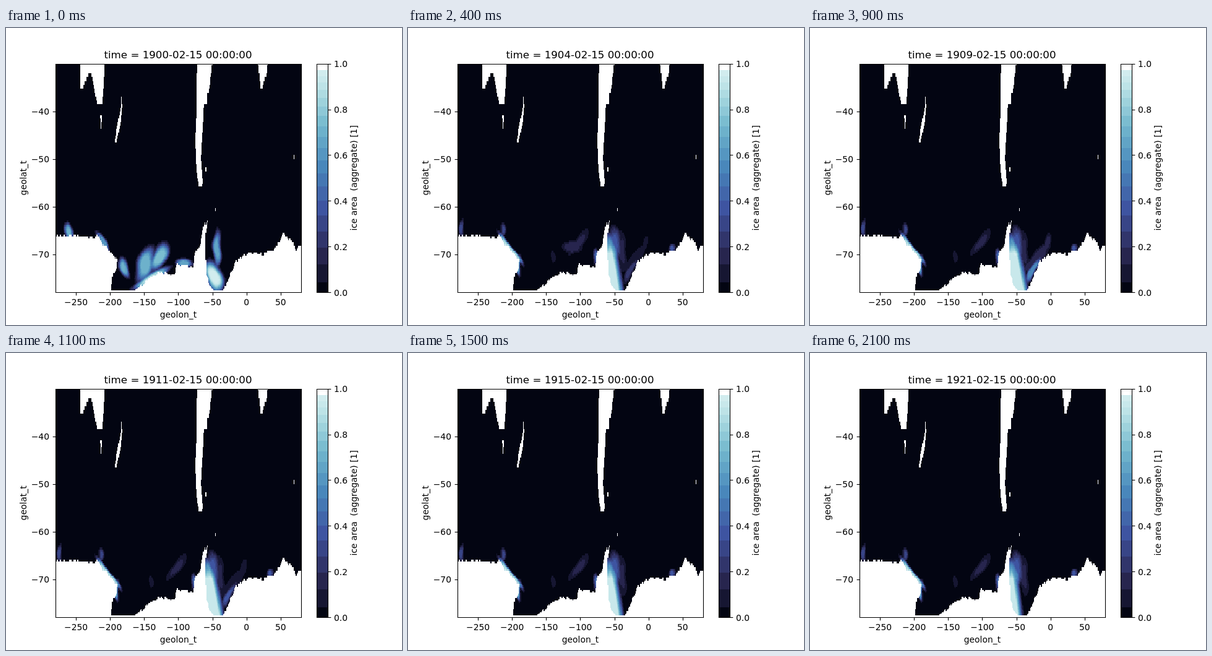
An HTML page with a canvas for the animation above (2.2 s loop, 640 by 480 pixels).

```html
<!DOCTYPE html>
<html lang="en">
<head>
<meta charset="utf-8">
<title>Ice area</title>
<style>
  html, body { margin: 0; width: 100%; height: 100%; overflow: hidden; background: #fff; }
  canvas, svg { position: absolute; left: 0; top: 0; width: 640px; height: 480px; }
  text { font: 13.89px "DejaVu Sans", Verdana, sans-serif; white-space: pre; fill: #000; }
  #title { font-size: 16.67px; }
  .line { fill: none; stroke: #000; stroke-width: 1.1; }
</style>
</head>
<body>
<canvas id="map" width="640" height="480"></canvas>
<svg id="axes" viewBox="0 0 640 480"></svg>
<script>
const LEFT = 80, RIGHT = 476.8, TOP = 57.6, BOTTOM = 427.2;
const PER_LON = (RIGHT - LEFT) / 360, PER_LAT = 7.7;
const FIRST_YEAR = 1900, YEARS = 22, STEP = 100;

const clamp = (v, lo = 0, hi = 1) => Math.min(hi, Math.max(lo, v));
const mix = (a, b, t) => a + (b - a) * t;
const smooth = v => { const t = clamp(v); return t * t * (3 - 2 * t); };
const lonX = lon => LEFT + (lon + 280) * PER_LON;
const latY = lat => TOP + (-30 - lat) * PER_LAT;
const random = n => { const s = Math.sin(n * 12.9898) * 43758.5453; return s - Math.floor(s); };

// Colour scale: flat bands that get narrower towards the top
const BANDS = 20;
const ramp = ['030512', '2c2a57', '3e53a0', '4886bb', '72b8cd', 'c0e5e8', 'ffffff']
  .map(hex => [0, 2, 4].map(i => parseInt(hex.slice(i, i + 2), 16)));
const bandEdge = i => i === 0 ? 0 : i === BANDS - 1 ? .973 : i === BANDS ? 1
  : .045 + .077 * (i - 1) - .0015 * (i - 1) * (i - 2);
function rampColour(v) {
  const p = v * 5.5, i = Math.floor(p);
  return `rgb(${ramp[i].map((c, k) => Math.round(mix(c, ramp[i + 1][k], p - i)))})`;
}
const bands = Array.from({ length: BANDS }, (_, i) =>
  i === 0 ? rampColour(0) : i === BANDS - 1 ? '#fff' : rampColour((bandEdge(i) + bandEdge(i + 1)) / 2));
const bandOf = v => {
  let i = 0;
  while (i < BANDS - 1 && v >= bandEdge(i + 1)) i++;
  return i;
};

// Land: key points of each coast
const shape = points => new Path2D(`M${points}Z`);
const polar = shape('70,335 150,338 156,349 170,364 180,375 179,391 173,396 170,424 208,424 222,413 ' +
  '230,404 248,394 273,398 275,383 303,385 305,360 313,355 318,324 326,311 323,330 322,345 324,398 ' +
  '330,417 336,424 351,424 362,400 372,376 390,364 418,365 434,358 448,332 464,347 468,359 480,347 ' +
  '480,440 70,440');
const lands = [
  '119,50 120,95 125,95 131,80 134,73 138,73 142,97 148,125 155,126 158,95 160,50',
  '152,141 153,163 154,163 155,141',
  '183,96 186,110 185,133 179,163 176,185 179,185 184,160 188,126 186,108',
  '309,50 308,140 306,180 308,230 312,257 316,257 318,250 315,212 320,126 325,122 325,105 329,100 334,50',
  '407,50 409,75 411,95 415,95 421,74 423,50'
].map(shape);
const islets = [[322, 225, 2, 7], [338, 291, 1, 5], [465, 205, 1, 7]];

// How patches come and go over the years
const settle = year => smooth(year / 3.5);
const thaw = year => 1 - settle(year);
const pulse = (peak, spread) => year => Math.exp(-(((year - peak) / spread) ** 2));
const early = pulse(4, 1.8), middle = pulse(8, 4);

// Sheared soft ellipse; lean is the sideways drift per pixel down
const patch = (life, strength, x, y, rx, ry, lean = 0) => ({ life, strength, x, y, rx, ry, lean });
const patches = [
  patch(thaw, .68, 101, 329, 9, 19),
  patch(thaw, .6, 157, 347, 8, 24, .55),
  patch(thaw, .68, 191, 387, 10, 22, .3),
  patch(thaw, .72, 225, 382, 18, 38, -.25),
  patch(thaw, .76, 248, 370, 17, 30, -.35),
  patch(thaw, .88, 235, 404, 18, 24, -1.5),
  patch(thaw, .65, 288, 380, 18, 10),
  patch(thaw, .64, 341, 357, 9, 40),
  patch(thaw, .95, 336, 402, 19, 34, .25),

  patch(settle, .28, 87, 324, 5, 20),
  patch(settle, .28, 153, 326, 6, 15),
  patch(settle, .88, 165, 356, 7, 34, .75),
  patch(settle, .7, 179, 384, 5, 22),
  patch(settle, .14, 276, 346, 12, 29, -.65),
  patch(early, .18, 266, 354, 22, 13),
  patch(settle, .08, 234, 370, 6, 15),
  patch(settle, .42, 303, 369, 5, 17, -.1),

  patch(settle, .34, 335, 346, 14, 34, .15),
  patch(settle, .52, 329, 353, 11, 30, .25),
  patch(settle, .14, 346, 361, 10, 44, .05),
  patch(middle, .6, 360, 392, 8, 28, -.5),
  patch(middle, .2, 366, 372, 15, 34, -.8),
  patch(middle, .17, 385, 346, 7, 19),
  patch(settle, .34, 428, 356, 7, 10)
];

function patchAt(p, x, y) {
  const dy = y - p.y;
  const dx = x - p.x - p.lean * dy + 1.5 * Math.sin(y / 7 + p.x);
  return smooth(1.4 * (1 - Math.hypot(dx / p.rx, dy / p.ry)));
}

// Thick ice east of the peninsula, widest near the tenth year
function shelfAt(year, x, y) {
  if (x < 318 || y < 326) return 0;
  const width = 15.5 + 9.5 * pulse(9.5, 6.5)(year);
  const edge = 325 + width * Math.pow((y - 325) / 95, .7);
  return .94 * settle(year) * clamp((edge + 5 - x) / 11) * clamp((y - 326) / 38);
}

// Grid cells: one degree wide, lower towards the pole
const cells = [];
for (let lat = -78; lat < -30;) {
  const next = Math.min(-30, lat + Math.cos(lat * Math.PI / 180));
  const y = Math.round(latY(next)), h = Math.round(latY(lat)) - y;
  for (let i = 0; i < 360; i++) {
    const x = Math.round(LEFT + i * PER_LON);
    cells.push({ x, y, w: Math.round(LEFT + (i + 1) * PER_LON) - x, h,
      cx: LEFT + (i + .5) * PER_LON, cy: y + h / 2, rough: 5 * random(i >> 1) - 2.5 });
  }
  lat = next;
}

const ctx = document.getElementById('map').getContext('2d');
const isLand = ({ cx, cy, rough }) =>
  ctx.isPointInPath(polar, cx, cy + (cy < 418 ? rough : 0)) ||
  lands.some(l => ctx.isPointInPath(l, cx, cy));
const landCells = cells.filter(isLand);
const iceCells = cells.filter(c => c.cy > 300 && !isLand(c));

function paint(g, year) {
  const box = (colour, x, y, w, h) => { g.fillStyle = colour; g.fillRect(x, y, w, h); };
  box('#fff', 0, 0, 640, 480);
  box(bands[0], 80, 58, 397, 369);
  for (const c of landCells) box('#fff', c.x, c.y, c.w, c.h);
  for (const i of islets) box('#fff', ...i);

  const live = patches.map(p => [p, p.strength * p.life(year)]).filter(l => l[1] > .01);
  for (const c of iceCells) {
    let sum = shelfAt(year, c.cx, c.cy) ** 4;
    for (const [p, strength] of live) sum += (strength * patchAt(p, c.cx, c.cy)) ** 4;
    const band = bandOf(Math.min(.96, sum ** .25));
    if (band) box(bands[band], c.x, c.y, c.w, c.h);
  }

  const barY = v => Math.round(mix(BOTTOM, TOP, v));
  bands.forEach((colour, i) => {
    const y = barY(bandEdge(i + 1));
    box(colour, 502, y, 18, barY(bandEdge(i)) - y);
  });
}

const frames = Array.from({ length: YEARS }, (_, year) => {
  const sheet = document.createElement('canvas');
  sheet.width = 640;
  sheet.height = 480;
  paint(sheet.getContext('2d'), year);
  return sheet;
});

// Axes and labels
const svg = document.getElementById('axes');
function add(tag, attrs, content = '') {
  const el = document.createElementNS('http://www.w3.org/2000/svg', tag);
  for (const k in attrs) el.setAttribute(k, attrs[k]);
  el.textContent = content;
  return svg.appendChild(el);
}
const line = d => add('path', { class: 'line', d });
const label = (s, x, y, anchor = 'middle') => add('text', { x, y: Math.round(y), 'text-anchor': anchor }, s);
const upright = (s, x, y) => label(s, 0, 0).setAttribute('transform', `translate(${x} ${y}) rotate(-90)`);
const signed = n => String(n).replace('-', '\u2212');
const snap = v => Math.round(v) + .5;

line('M80.5 58.5H477.5V427.5H80.5Z');
line('M502.5 58.5H520.5V427.5H502.5Z');
for (let lon = -250; lon <= 50; lon += 50) {
  line(`M${snap(lonX(lon))} 427.5v4.86`);
  label(signed(lon), lonX(lon), 448);
}
for (let lat = -40; lat >= -70; lat -= 10) {
  line(`M80.5 ${snap(latY(lat))}h-4.86`);
  label(signed(lat), 70, latY(lat) + 5.3, 'end');
}
for (let i = 0; i <= 5; i++) {
  const y = mix(BOTTOM, TOP, i / 5);
  line(`M520.5 ${snap(y)}h4.86`);
  label((i / 5).toFixed(1), 530, y + 5.3, 'start');
}
label('geolon_t', 278.4, 468);
upright('geolat_t', 33, 242.4);
upright('ice area  (aggregate) [1]', 567, 242.4);
const title = label('', 278, 49);
title.id = 'title';

const start = performance.now();
let shown = -1;
function tick() {
  const year = Math.floor((performance.now() - start) / STEP) % YEARS;
  if (year !== shown) {
    shown = year;
    ctx.drawImage(frames[year], 0, 0);
    title.textContent = `time = ${FIRST_YEAR + year}-02-15 00:00:00`;
  }
  requestAnimationFrame(tick);
}
tick();
</script>
</body>
</html>
```
